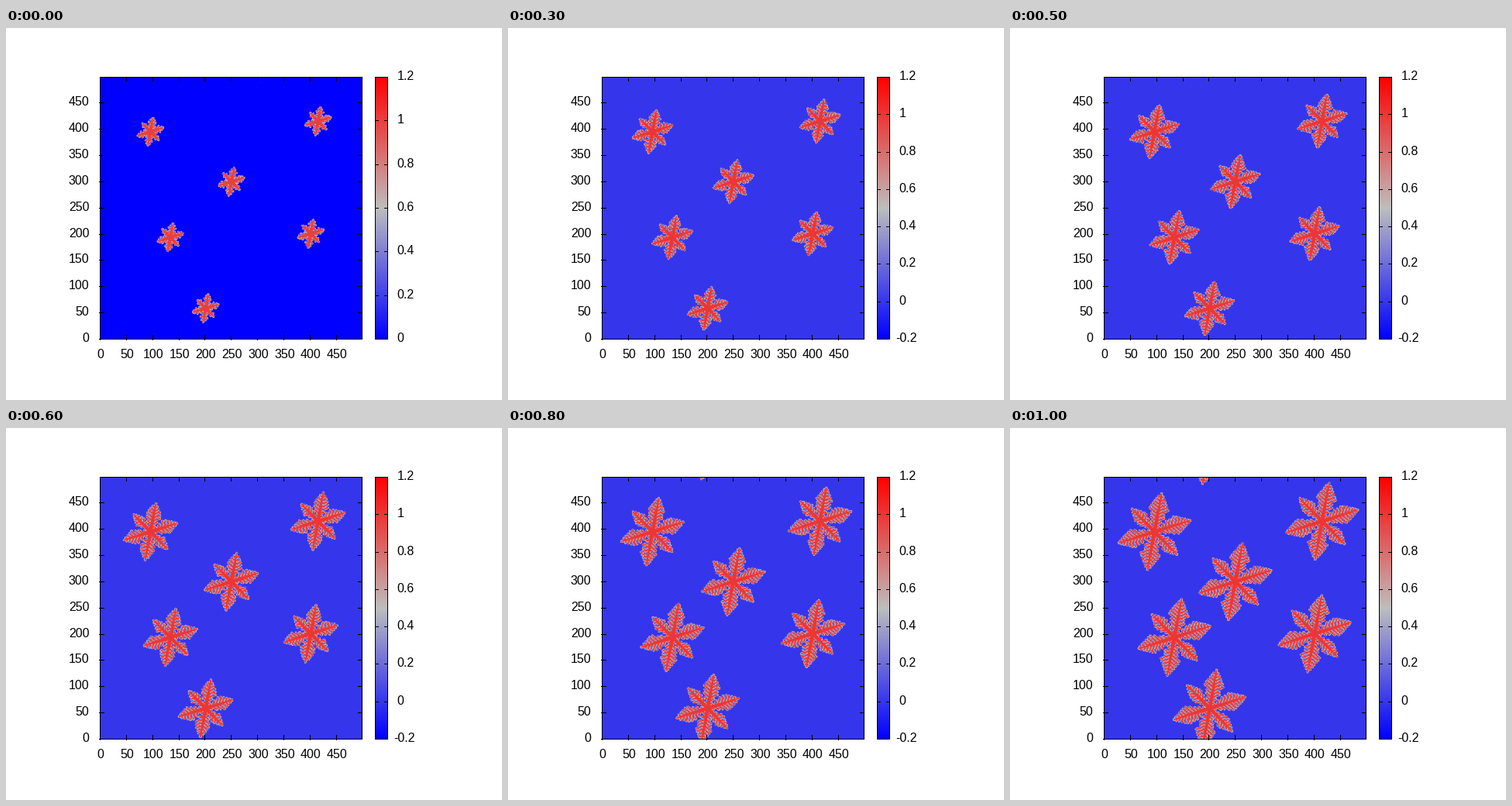
Recreate the animation shown at these times as a matplotlib script. Size 640 by 480 pixels, loop 1100 ms.

```python
import numpy as np
import matplotlib.pyplot as plt
from matplotlib.animation import FuncAnimation
from matplotlib.colors import LinearSegmentedColormap

STEPS, N, R = 11, 500, 84
LEFT, RIGHT, TOP, BOTTOM = 121.5, 459.5, 63.5, 401.5
BAR_L, BAR_R = 476.5, 492.5
SCALE = (RIGHT - LEFT) / (N - 1)
SEEDS = [(96, 395), (415, 415), (250, 300), (134, 194), (401, 201), (201, 59)]
# angle, first length, growth per step, branch slope, branch cap
ARMS = [(79.5, 28.4, 4.72, 0.50, 0.68),
        (17.5, 26.8, 4.60, 0.50, 0.68),
        (134.5, 23.4, 3.90, 0.44, 0.56)]
GAP = 6.4

gy, gx = np.mgrid[-R:R + 1, -R:R + 1].astype(float)
rng = np.random.default_rng(4)
jitter = rng.uniform(0.66, 1.0, (3, 2, 20))


def capsule(x, y, angle, length, r0, r1):
    """Signed distance to a tapered rod starting at (x, y)."""
    c, s = np.cos(angle), np.sin(angle)
    t = np.clip((gx - x) * c + (gy - y) * s, 0, length)
    d = np.hypot(gx - x - t * c, gy - y - t * s)
    return d - (r0 + (r1 - r0) * t / length)


def flake(step):
    """Phase field of one crystal, symmetric about its centre."""
    dist = np.hypot(gx, gy) - 8
    for a, (deg, start, rate, slope, cap) in enumerate(ARMS):
        ang = np.radians(deg)
        tip = start + rate * step
        dist = np.minimum(dist, capsule(0, 0, ang, tip - 2, 4.8, 2))
        for i, s in enumerate(np.arange(8, tip - 5, GAP)):
            for side in (0, 1):
                size = min(slope * (tip - s), cap * s * jitter[a, side, i] + 1)
                turn = ang + np.radians(60 if side else -60)
                rod = capsule(s * np.cos(ang), s * np.sin(ang),
                              turn, size, 2.3, 1.9)
                dist = np.minimum(dist, rod)
    dist = np.minimum(dist, dist[::-1, ::-1])
    return 0.5 * (1 - np.tanh(1.2 * dist))


def field(step):
    out = np.zeros((N, N))
    patch = flake(step)
    span = np.arange(-R, R + 1)
    for cx, cy in SEEDS:
        cells = np.ix_((span + cy) % N, (span + cx) % N)
        out[cells] = np.maximum(out[cells], patch)
    return out


fields = [field(k) for k in range(STEPS)]

fig = plt.figure(figsize=(8, 6), dpi=80, facecolor="white")
ax = fig.add_axes([0, 0, 1, 1])
cmap = LinearSegmentedColormap.from_list(
    "bgr", ["#0000ff", "#bebebe", "#ff0000"], N=256)


def picture(data, x0, x1):
    """Fill a box out to the outer edge of its one pixel border."""
    return ax.imshow(data, cmap=cmap, vmin=0, vmax=1, origin="lower",
                     interpolation="nearest", aspect="auto",
                     extent=(x0 - 0.5, x1 + 0.5, BOTTOM + 0.5, TOP - 0.5))


image = picture(fields[0], LEFT, RIGHT)
picture(np.linspace(0, 1, 256)[:, None], BAR_L, BAR_R)
ax.set(xlim=(0, 640), ylim=(480, 0))
ax.axis("off")


def line(xs, ys):
    return ax.plot(xs, ys, color="black", lw=0.9, snap=False,
                   solid_capstyle="butt", solid_joinstyle="miter")[0]


def label(x, y, text, ha):
    return ax.text(x, y, text, ha=ha, va="baseline", fontsize=14.4,
                   family="Liberation Sans", color="black")


def box(x0, x1):
    line([x0, x1, x1, x0, x0, x1], [TOP, TOP, BOTTOM, BOTTOM, TOP, TOP])


def crisp(v):
    """Centre of the pixel that holds v."""
    return np.floor(v) + 0.5


box(LEFT, RIGHT)
box(BAR_L, BAR_R)
for v in range(0, N, 50):
    x, y = crisp(LEFT + v * SCALE), crisp(BOTTOM - v * SCALE)
    line([x, x], [BOTTOM + 1.5, BOTTOM - 5.5])
    line([x, x], [TOP - 0.5, TOP + 5.5])
    line([LEFT - 1.5, LEFT + 5.5], [y, y])
    line([RIGHT + 0.5, RIGHT - 5.5], [y, y])
    label(x + 0.8, 426.5, str(v), "center")
    label(107.3, y + 3.6, str(v), "right")

bar = [(line([BAR_L, BAR_L + 4.5], [0, 0]), line([BAR_R - 4.5, BAR_R], [0, 0]),
        label(0, 0, "", "left")) for _ in range(8)]


def draw(step):
    low = 0 if step < 3 else -2
    image.set_data(fields[step])
    image.set_clim(low / 10, 1.2)
    for i, (a, b, text) in enumerate(bar):
        v = low + 2 * i
        shown = v <= 12
        y = crisp(BOTTOM - (BOTTOM - TOP) * (v - low) / (12 - low))
        for tick in (a, b):
            tick.set_ydata([y, y])
            tick.set_visible(shown)
        text.set_text(f"{v / 10:g}")
        text.set_position((500.4 if v < 0 else 504.8, y + 3.6))
        text.set_visible(shown)
    return [image]


anim = FuncAnimation(fig, draw, frames=STEPS, interval=100,
                     repeat=True, repeat_delay=0)
plt.show()
```
